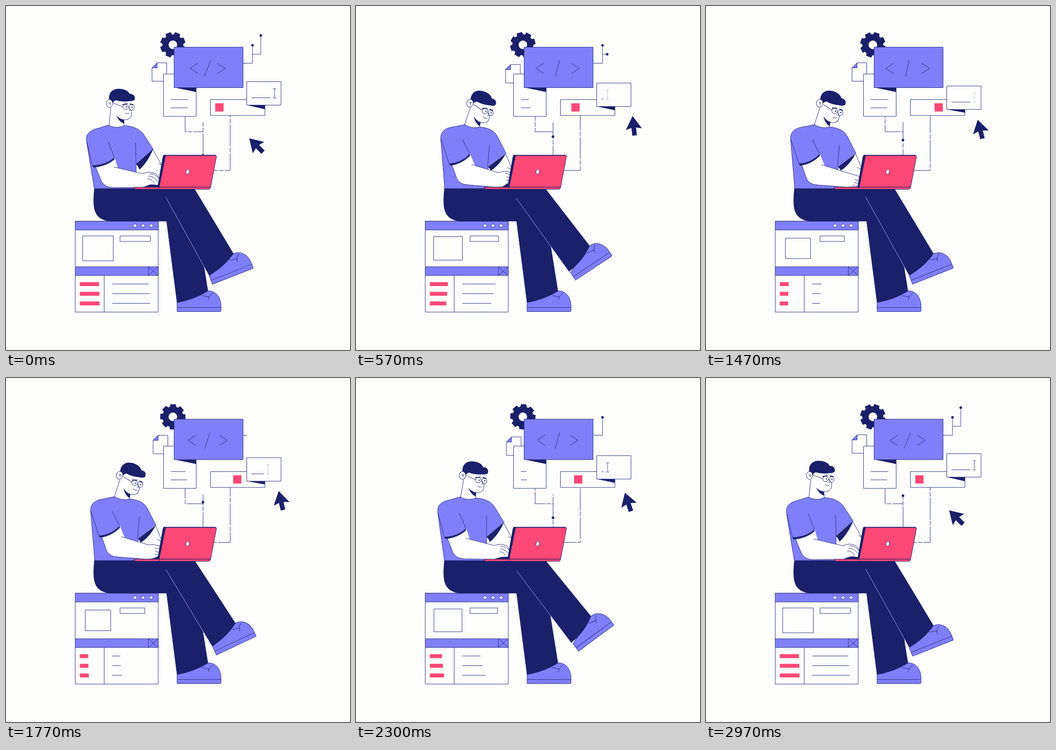
Animation of 748 by 748 pixels, one loop 3.01 s. Source, as an HTML page with a canvas:

```html
<!DOCTYPE html>
<html lang="en">
<head>
<meta charset="utf-8">
<title>Developer at work</title>
<style>
html, body { margin: 0; width: 100%; height: 100%; overflow: hidden; background: #fdfdfc; }
canvas { display: block; width: 748px; height: 748px; }
</style>
</head>
<body>
<canvas id="stage" width="748" height="748"></canvas>
<script>
const ctx = document.getElementById('stage').getContext('2d');
const LOOP = 3010, TAU = Math.PI * 2;
const NAVY = '#1a2069', LINE = '#2b3080', VIOLET = '#7f7ff9', PINK = '#fb4877', PAPER = '#fdfdfc';

const lerp = (a, b, k) => a + (b - a) * k;
const ease = k => (1 - Math.cos(Math.PI * k)) / 2;
// 0 at the start of a cycle, 1 in the middle
const wave = (t, period) => (1 - Math.cos(TAU * t / period)) / 2;

// keys: [time, value, value...], at rest on each key
function track(keys, t) {
  let i = 0;
  while (i < keys.length - 2 && t >= keys[i + 1][0]) i++;
  const a = keys[i], b = keys[i + 1], k = ease((t - a[0]) / (b[0] - a[0]));
  return a.slice(1).map((v, j) => lerp(v, b[j + 1], k));
}

// blends two path strings of equal structure
function mix(a, b, k) {
  const nums = b.match(/-?\d+(\.\d+)?/g);
  let i = 0;
  return a.replace(/-?\d+(\.\d+)?/g, n => lerp(+n, +nums[i++], k).toFixed(2));
}

function shape(d, fill, stroke, width = 1) {
  const p = new Path2D(d);
  if (fill) { ctx.fillStyle = fill; ctx.fill(p); }
  if (stroke) { ctx.strokeStyle = stroke; ctx.lineWidth = width; ctx.stroke(p); }
}
const line = (d, color = LINE, width = 1) => shape(d, null, color, width);
const box = (x, y, w, h, fill, stroke = LINE) => shape(`M${x} ${y}h${w}v${h}h${-w}Z`, fill, stroke);

function oval(x, y, rx, ry, fill, stroke, turn = 0) {
  ctx.beginPath();
  ctx.ellipse(x, y, rx, ry, turn, 0, TAU);
  if (fill) { ctx.fillStyle = fill; ctx.fill(); }
  if (stroke) { ctx.strokeStyle = stroke; ctx.lineWidth = 1; ctx.stroke(); }
}

function placed(x, y, deg, draw) {
  ctx.save();
  ctx.translate(x, y);
  ctx.rotate(deg * Math.PI / 180);
  draw();
  ctx.restore();
}

const BODY = [[0, 0], [350, 1.04], [900, 1.03], [1400, 1], [2060, 1], [2480, -.15], [2900, 0], [LOOP, 0]];
const POINTER = [[0, 544, 303, -45], [220, 539, 305, -58], [620, 606, 259, -4], [1050, 596, 268, -14],
  [1640, 596, 268, -14], [2200, 609, 258, -4], [2500, 539.5, 304.5, -59], [2870, 544, 303, -45], [LOOP, 544, 303, -45]];
const CARET = [[0, 584], [800, 538], [1510, 584], [1760, 570], [2430, 545], [LOOP, 584]];

// leg swing: two per loop, slower up than down
function swing(t) {
  const s = (t + LOOP) % (LOOP / 2);
  return s < 800 ? ease(s / 800) : ease((LOOP / 2 - s) / (LOOP / 2 - 800));
}

function gear(t) {
  placed(362.8, 84.4, 22.5 + 270 * t / LOOP, () => {
    ctx.beginPath();
    for (let i = 0; i < 8; i++) {
      const a = i * TAU / 8;
      for (const [r, d] of [[22.8, -.3], [28, -.21], [28, .21], [22.8, .3]])
        ctx.lineTo(r * Math.sin(a + d), -r * Math.cos(a + d));
    }
    ctx.closePath();
    ctx.moveTo(9.3, 0);
    ctx.arc(0, 0, 9.3, 0, TAU, true);
    ctx.fillStyle = NAVY;
    ctx.fill();
  });
}

function branches(t) {
  const open = 1 - wave(t, LOOP);
  const main = Math.min(1, open * 2) * 60, side = Math.max(0, (open - .62) / .38) * 59;
  if (main < 1) return;
  const x = 515 + Math.min(main, 21), y = 124.5 - Math.max(0, main - 21);
  line(`M515 124.5H${x}V${y}`);
  if (main > 21) oval(x, y, 2.8, 2.8, NAVY);
  if (side > 1) {
    const sx = 536 + Math.min(side, 18), sy = 105 - Math.max(0, side - 18);
    line(`M536 105H${sx}V${sy}`);
    oval(sx, sy, 2.8, 2.8, NAVY);
  }
}

function wires(t) {
  const k = t / (LOOP / 3) % 1;
  ctx.setLineDash([48, 2.5, 10, 2.5]);
  ctx.lineDashOffset = -63 * k - 24;
  line('M452 357.5H487.5V238');
  ctx.lineDashOffset = -63 * k + 11;
  line('M389.5 240V273.5H428');
  ctx.lineDashOffset = -63 * k;
  line('M428.5 325V253');
  ctx.setLineDash([]);
  oval(428.3, 325 - 72 * k, 2.8, 2.8, NAVY);
}

function documents(t) {
  const q = swing(t), q2 = swing(t - 100);
  const x = 317.5 + 9.5 * q, y = 123.5 + 4.7 * q;
  shape(`M${x} ${y + 11}L${x + 11} ${y}H${x + 32}V${y + 40}H${x}Z`, PAPER, LINE);
  shape(`M${x} ${y + 11}L${x + 11} ${y}V${y + 11}Z`, VIOLET, LINE);
  box(342.5, 148, 71, 92, PAPER);
  shape('M365 177H413.5V187Z', NAVY);
  line(`M358.5 203.5H${396.5 - 26 * q}M358.5 221.5H${396.5 - 26 * q2}`);
}

function codeBoard(t) {
  box(365.5, 89.5, 150, 88, VIOLET);
  const k = wave(t, LOOP / 3), s = 9.7 * k;
  line(`M${417 - s} 124.5L${400 - s} 135.5L${417 - s} 146.5M${459.5 + s} 124.5L${476.5 + s} 135.5L${459.5 + s} 146.5`);
  line(mix('M445 119L431 153', 'M442 117.5L434 153.5', k));
}

function inputs(t) {
  const k = wave(t, LOOP), y = 164.5 + 9.5 * k;
  box(444.5, 203.5, 118.5, 34.5, PAPER);
  box(455 + 42 * k, 211.5, 18, 18, PINK, null);
  shape(`M524 ${y + 51}H563V${y + 60 - 2 * k}Z`, NAVY);
  box(523.5, y, 74.5, 51, PAPER);
  const [x] = track(CARET, t);
  if (x > 544) line(`M534 ${y + 35}H${x - 9}`);
  ctx.globalAlpha = Math.max(.18, (1 - wave(t, LOOP / 9)) ** 1.2);
  line(`M${x - 3.5} ${y + 15.5}h7m-3.5 0v20m-3.5 0h7`);
  ctx.globalAlpha = 1;
}

function pointer(t) {
  const [x, y, turn] = track(POINTER, t);
  placed(x, y, turn, () => shape('M0 -21.5L17.5 7L5 4V21H-5V4L-17.5 7Z', NAVY));
}

function seat(t) {
  box(150.5, 468, 180.5, 197.5, PAPER);
  box(150.5, 468, 180.5, 19, VIOLET);
  for (const x of [280.5, 298, 315.5]) oval(x, 477.5, 4, 3.4, '#fff', LINE);
  box(150.5, 567, 180.5, 19, VIOLET);
  line('M309.5 567V586M309.5 567L331 586M331 567L309.5 586M213.5 586V665');
  const s = 1 - .18 * wave(t, LOOP), w = 66.5 * s, h = 54 * s;
  box(200 - w / 2, 527 - h / 2, w, h, null);
  box(248, 500, 66 * (1 - .2 * wave(t, LOOP)), 12, null);
  [195, 110, 25].forEach((delay, i) => {
    const k = 1 - wave(t - delay, LOOP), y = 600.5 + 21 * i;
    box(160.5, y, 18 + 25 * k, 8.5, PINK, null);
    line(`M231 ${y + 4}h${17 + 65 * k}`);
  });
}

// drawn from the heel, sole along x
function shoe(x, y, deg) {
  placed(x, y, deg, () => {
    shape('M0 0V-20L67 -45C84 -46 96.5 -31 95.5 -9V-2Q95.5 0 93 0Z', VIOLET, LINE);
    line('M0 -9H95.5M54 -35L71 -31.5M78 -40Q69 -36 68 -25');
  });
}

function legs(t) {
  const q = swing(t), deg = -21.5 - 15 * q;
  const hx = 449 + 35 * q, hy = 605 - 11 * q, a = deg * Math.PI / 180;
  const at = (u, v) => `${hx + u * Math.cos(a) - v * Math.sin(a)} ${hy + u * Math.sin(a) + v * Math.cos(a)}`;
  const hem = at(-2 * q, -20 - 4 * q), crease = `${347 + 2 * q} ${415 + 4 * q}`;
  shoe(372, 664.5, 0);
  shape('M349 466L372 645Q410 638 439 620L407 420Z', NAVY, LINE);
  shape('M192 396C189 424 189 444 199 456Q209 468 231 468.3H351L410 425V397Z', NAVY);
  shoe(hx, hy, deg);
  shape(`M${crease}L340 396L${411 + 3 * q} 399L${at(67, -45)}Q${at(38, -26)} ${hem}Z`, NAVY);
  line(`M${crease}L${hem}`, '#a5a8f5');
}

function head(p) {
  placed(225 + 22 * p, 212 - .5 * p, 12.5 * p, () => {
    ctx.translate(-225, -212);
    shape('M228 215L224 262L257 266V247Q271 248 273 237V205L238 200Z', '#fff');
    line('M228 221L224 260M273 224V237Q271 247 258 247.5Q248 247 240 239M256.5 248L257 264');
    shape('M240 239Q248 247 256.5 247.5L257 256Q246 252 240 239Z', NAVY);
    shape('M226 211C220 192 229 180 245 180C257 180 265 184 269 191C278 191 281 196 280 203Q278 207 267 207Q252 209 239 205Q233 206 231 215Z', NAVY);
    oval(225, 212, 7, 8.5, '#fff', LINE);
    line('M223 209Q227 211 227 216M228 209L225 213');
    // the face tips a little further than the head
    ctx.translate(.5 * p, 1.8 * p);
    line('M233 211L254 219');
    oval(260, 219.5, 6, 6, '#fff', LINE);
    oval(273, 220.5, 5.5, 6, '#fff', LINE);
    oval(262, 219.5, 1.2, 1.5, NAVY);
    oval(274, 220, 1.2, 1.5, NAVY);
    line('M253 214.5L264 212.5M269 213L277 214.5', NAVY, 2);
    line('M268 221Q273 228 267 227.5M259 232Q263 236 268 233');
  });
}

function torso(p) {
  const m = (a, b) => mix(a, b, p);
  shape(m('M222 259Q240 268 258 260C277 261 291 268 299 279L320 311L283 344L283 397L192 397L176 300C173 282 176 276 190 269Z',
    'M236 258Q252 268 269 263C289 265 300 271 307 283L326 320L287 350L286 397L193 397L184 290C183 276 190 268 205 264Z'), VIOLET, LINE);
  // far arm
  shape(m('M319 312L338 345L335 376L296 370L284 344Z', 'M325 320L338 352L336 380L300 372L287 350Z'), '#fff');
  line(m('M319 312L338 345M332 342L338 346', 'M325 320L338 352M329 351L338 355'));
  shape(m('M320 311L283 344Q288 349 290 356Q308 340 320 311Z', 'M326 320L287 350Q291 353 293 358Q312 346 326 320Z'), NAVY);
  line(m('M281.5 298L283 344', 'M290 302L286 350'));
}

function nearArm(p, tap) {
  const m = (a, b, c) => mix(a, c ? mix(b, c, tap) : b, p);
  shape('M300 394L318 387H332V394Z', NAVY);
  const arm = m(
    'M194 348L208 382Q215 394 232 395L298 394.5L308 390Q316 387 331 390L334 378Q330 367 325 364L312 361L296 364.5L234 350',
    'M208 345L219 376Q225 388 242 389L306 394L318 393Q324 390 330 385L336 378Q338 364 334 361L321 359L310 362.5L251 345',
    'M208 345L219 376Q225 388 242 389L306 394L318 393Q324 394 330 392L334 388Q335 374 332 370L322 367L310 363.5L251 345');
  shape(arm + m('L243 352L236 328L200 335Z', 'L258 347L247 320L214 332Z'), '#fff');
  line(arm);
  line(m('M311 365Q325 364 333 376M309 370Q321 369 330 382M307 376Q316 375 323 386',
    'M324 364Q330 364 336 367M326 371Q330 372 335 374M326 378Q330 378 334 380',
    'M324 378Q328 378 333 380M322 384Q326 384 331 386M319 391Q321 387 325 391'));
  shape(m('M188 347Q216 346 236 330L235 334Q218 348 191 351Z', 'M202 343Q228 342 247 322L247 326Q230 343 205 347Z'), NAVY, LINE);
  const sleeve = m('M176 296L188 347Q216 346 236 330L222 295', 'M184 288L202 343Q228 342 247 322L231 290');
  shape(sleeve + 'Z', VIOLET);
  line(sleeve);
}

function laptop() {
  shape('M341 327Q342 324.5 345 324.5H352L340 395H329Z', NAVY);
  shape('M347 325H455Q458 325 457.5 328L445 394H333Z', PINK, NAVY);
  line('M342 324.5H456', NAVY, 1.4);
  shape('M278 394H445L443.5 397Q443 398.5 441 398.5H283Q279 398 278 394Z', PINK, NAVY);
  line('M333 394V398');
  oval(395, 360.5, 3.5, 5.2, '#fff', LINE, .25);
}

function draw(t) {
  ctx.fillStyle = PAPER;
  ctx.fillRect(0, 0, 748, 748);
  const [lean] = track(BODY, t);
  const tap = (1 - wave(t - 1470, LOOP / 8)) ** 2;
  gear(t);
  branches(t);
  documents(t);
  codeBoard(t);
  inputs(t);
  wires(t);
  pointer(t);
  seat(t);
  legs(t);
  head(lean);
  torso(lean);
  nearArm(lean, tap);
  laptop();
}

const start = performance.now();
function tick() {
  draw((performance.now() - start) % LOOP);
  requestAnimationFrame(tick);
}
draw(0);
requestAnimationFrame(tick);
</script>
</body>
</html>
```
